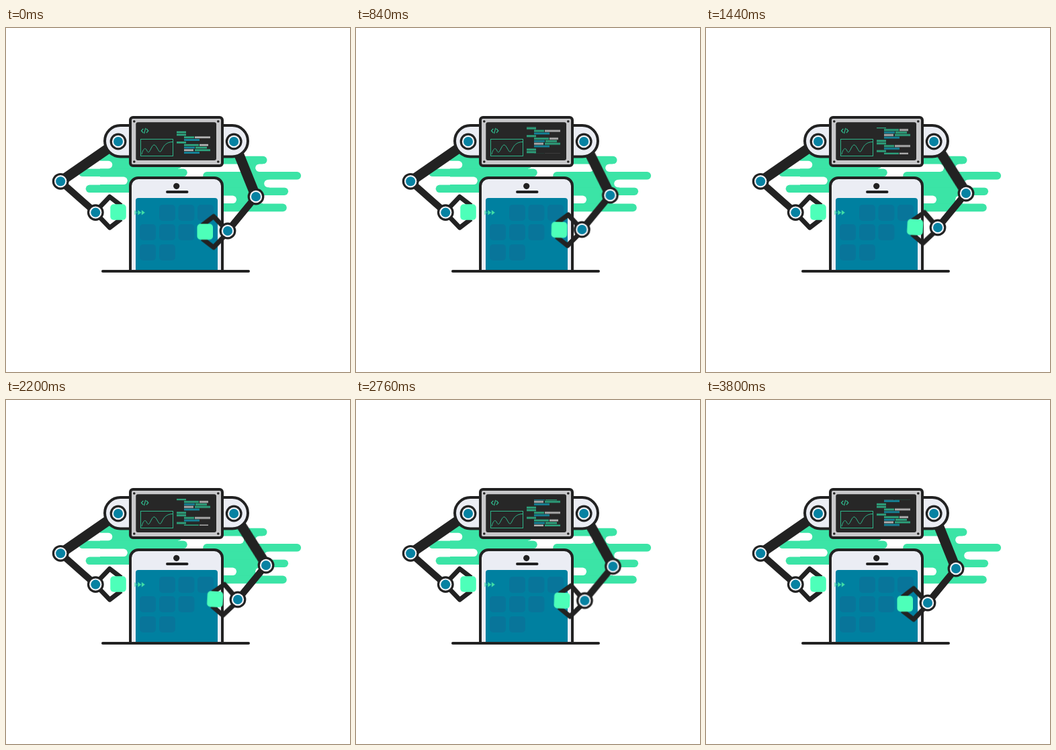
An HTML page for the animation above (3840 ms loop, 512 by 512 pixels).

```html
<!DOCTYPE html>
<html lang="en">
<head>
<meta charset="utf-8">
<title>Robot arms building an app</title>
<style>
  html, body { margin: 0; width: 100%; height: 100%; overflow: hidden; background: #fff; }
  svg { display: block; width: 100vw; height: 100vh; }

  .ink { fill: #222; }
  .rod { stroke: #222; fill: none; }
  .light { fill: #ebedf4; stroke: #222; stroke-width: 4; }
  .mint { fill: #3be4a6; stroke: #3be4a6; }
  .gap { stroke: #fff; }
  .streaks line { stroke-width: 11.6; stroke-linecap: round; }
  .streaks rect { stroke: none; }
  .cube { fill: #4dffb9; }
  .tiles use { fill: #08759a; }
  .trace { fill: none; stroke: #2fb58a; }
  .g { fill: #2ea780; }
  .b { fill: #14879d; }
  .w { fill: #b3b3b3; }

  .upper, .lower, .grip, .scroll { animation: 3840ms infinite; }
  .upper, .lower, .grip { animation-timing-function: cubic-bezier(.37, 0, .63, 1); }
  .scroll { animation-name: scroll; animation-timing-function: cubic-bezier(.4, 0, .6, 1); }
  .upper { animation-name: swing; transform-origin: 339px 169px; }
  .lower { animation-name: shift; }
  .grip { animation-name: tilt; transform-origin: 330px 302px; }

  @keyframes swing {
    0%, 12.5%, 90.1%, 100% { transform: rotate(0deg); }
    33.33%, 60.94% { transform: rotate(-10.4deg); }
  }
  @keyframes shift {
    0%, 12.5%, 90.1%, 100% { transform: translate(0, 0); }
    33.33%, 60.94% { transform: translate(15px, -5px); }
  }
  @keyframes tilt {
    0%, 12.5%, 90.1%, 100% { transform: rotate(0deg); }
    33.33%, 60.94% { transform: rotate(3deg); }
  }
  @keyframes scroll {
    0% { transform: translateY(0); }
    9.375%, 27.08% { transform: translateY(-9.6px); }
    37.5%, 56.25% { transform: translateY(-22.5px); }
    66.67%, 90.63% { transform: translateY(-30.4px); }
    100% { transform: translateY(-35.4px); }
  }
</style>
</head>
<body>
<svg viewBox="0 0 512 512">
  <defs>
    <g id="joint">
      <circle r="12.4" class="ink"/>
      <circle r="9.2" fill="#f1f3f7"/>
      <circle r="7" fill="#0782a2"/>
    </g>
    <g id="claw">
      <path class="rod" stroke-width="7" stroke-linejoin="round" d="M0-1 21-23 38-10M0 1 21 23 38 10"/>
      <rect class="cube" x="22" y="-12" width="23.5" height="23.5" rx="5"/>
    </g>
    <rect id="tile" width="24" height="24" rx="5"/>
    <path id="chevron" d="M0 0 5 3.7 0 7.4Z"/>
    <g id="code"></g>
    <clipPath id="pane"><rect x="250" y="147.8" width="60" height="39.4"/></clipPath>
  </defs>

  <g class="streaks mint">
    <rect x="140" y="192" width="116" height="48"/>
    <line x1="146" y1="192" x2="256" y2="192"/>
    <line x1="200" y1="203.5" x2="256" y2="203.5"/>
    <line x1="114" y1="215.3" x2="264" y2="215.3"/>
    <line x1="124.5" y1="239.3" x2="200" y2="239.3"/>
    <line class="gap" x1="90" y1="203.5" x2="152.5" y2="203.5"/>
    <line class="gap" x1="90" y1="227.3" x2="175" y2="227.3"/>

    <rect x="315" y="197" width="67" height="70"/>
    <rect x="380" y="225" width="12" height="13"/>
    <line x1="310" y1="196.6" x2="382.7" y2="196.6"/>
    <line x1="299" y1="219.9" x2="433.3" y2="219.9"/>
    <line x1="320" y1="243.2" x2="414.3" y2="243.2"/>
    <line x1="320" y1="267.4" x2="412" y2="267.4"/>
    <line class="gap" x1="300" y1="208.2" x2="348.3" y2="208.2"/>
    <line class="gap" x1="377" y1="208.2" x2="460" y2="208.2"/>
    <line class="gap" x1="390" y1="231.5" x2="460" y2="231.5"/>
    <line class="gap" x1="300" y1="255.3" x2="337.3" y2="255.3"/>
    <line class="gap" x1="377" y1="255.3" x2="460" y2="255.3"/>
  </g>

  <!-- phone -->
  <path class="light" d="M185 362V235a12 12 0 0 1 12-12H310a12 12 0 0 1 12 12V362"/>
  <path fill="#0080a0" d="M193 362V257a4 4 0 0 1 4-4H311a4 4 0 0 1 4 4V362Z"/>
  <circle class="ink" cx="253.7" cy="235.3" r="4.6"/>
  <path class="rod" stroke-width="4" stroke-linecap="round" d="M240 244H269.5"/>
  <g class="tiles">
    <use href="#tile" x="228" y="263"/><use href="#tile" x="256.5" y="263"/><use href="#tile" x="285" y="263"/>
    <use href="#tile" x="199" y="292"/><use href="#tile" x="228" y="292"/><use href="#tile" x="256.5" y="292"/>
    <use href="#tile" x="199" y="322"/><use href="#tile" x="228" y="322"/>
  </g>
  <g fill="#3fdca6">
    <use href="#chevron" x="191" y="271" opacity=".55"/>
    <use href="#chevron" x="196.3" y="271"/>
    <use href="#chevron" x="201.8" y="271"/>
  </g>
  <path class="rod" stroke-width="4" stroke-linecap="round" d="M144 362H361"/>

  <!-- left arm -->
  <path class="rod" stroke-width="15" d="M167 169 81 228.3"/>
  <path class="rod" stroke-width="10" d="M81 228.3 133.3 274.6"/>
  <use href="#claw" x="133.3" y="274.2"/>
  <use href="#joint" x="81.2" y="228.3"/>
  <use href="#joint" x="133.3" y="274.6"/>

  <!-- right arm -->
  <path class="rod upper" stroke-width="15" d="M339 169 372 251"/>
  <g class="lower">
    <path class="rod" stroke-width="10" d="M372 251 330 302"/>
    <g class="grip"><use href="#claw" transform="translate(330 303.5) scale(-1 1)"/></g>
    <use href="#joint" x="372" y="251"/>
    <use href="#joint" x="330" y="302"/>
  </g>

  <!-- head -->
  <rect class="light" x="147" y="145" width="213" height="46.5" rx="23.2"/>
  <use href="#joint" x="167" y="169"/>
  <use href="#joint" x="339.2" y="169"/>
  <rect x="185" y="133" width="137" height="72" rx="4" fill="#c8c8ca" stroke="#222" stroke-width="4"/>
  <rect x="193.3" y="140.3" width="119.7" height="56.7" rx="3" fill="#272727"/>
  <g class="ink">
    <circle cx="190.8" cy="139" r="1.8"/><circle cx="315.8" cy="139" r="1.8"/>
    <circle cx="190.8" cy="199" r="1.8"/><circle cx="315.8" cy="199" r="1.8"/>
  </g>
  <path class="trace" stroke-width="1.3" d="M204.3 150 201.5 153 204.3 156M209 150 211.8 153 209 156M207.8 148.8 205.6 157.2"/>
  <rect class="trace" x="200.5" y="165.5" width="48" height="25"/>
  <path class="trace" d="M202 188C204 180 207 177 209.500 182S213 185 216 179 221 172 224.500 178 229 187 232 181 238 170 248 169.500"/>
  <g clip-path="url(#pane)">
    <g class="scroll"><use href="#code"/><use href="#code" y="35.4"/></g>
  </g>
</svg>
<script>
  // Each line of code: colour, left, right for every bar.
  const lines = [
    'g 254 268', 'g 254 268', 'g 265 280 w 281 304', 'b 265 288', 'g 254 268',
    'g 265 287 w 288 301', 'b 265 281 g 282 299', 'w 265 279 g 281 304', 'b 265 288'
  ];
  document.getElementById('code').innerHTML = lines.map((line, i) =>
    line.replace(/(\w) (\d+) (\d+)/g, (_, tone, left, right) =>
      `<rect class="${tone}" x="${left}" y="${153.7 + i * 3.82}" width="${right - left}" height="2.8"/>`)
  ).join('');
</script>
</body>
</html>
```
